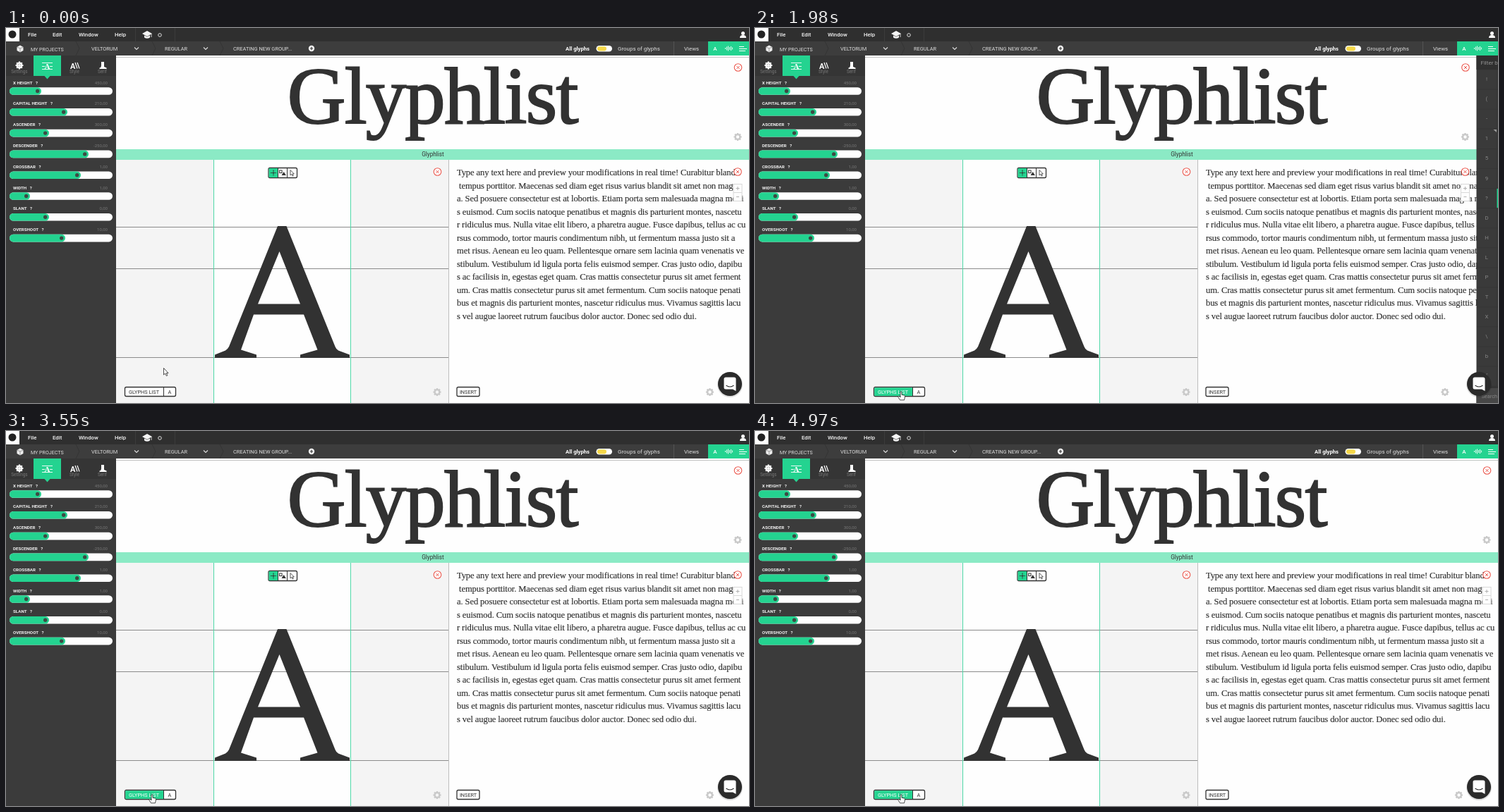
Recreate the animation shown at these times as an HTML page. Size 1053 by 532 pixels, loop 5.24 s.

```html
<!DOCTYPE html>
<html lang="en">
<head>
<meta charset="utf-8">
<title>Glyph list panel</title>
<style>
  html, body { margin: 0; width: 100%; height: 100%; overflow: hidden; background: #fefefe; }
  svg { display: block; width: 100%; height: 100%; }
  text { font-family: Roboto, "Open Sans", sans-serif; white-space: pre; }
  .serif { font-family: "Liberation Serif", "Noto Serif", serif; }
</style>
</head>
<body>
<svg id="stage" viewBox="0 0 1053 532"></svg>
<script>
const GREEN = '#24d390', DARK = '#323232', LOOP = 5240, PANEL = 112;

// SVG string helpers
const el = (tag, attrs, inner = '') =>
  `<${tag} ${Object.entries(attrs).map(([k, v]) => `${k}="${v}"`).join(' ')}>${inner}</${tag}>`;
const rect = (x, y, width, height, fill, more = {}) => el('rect', { x, y, width, height, fill, ...more });
const circle = (cx, cy, r, fill, more = {}) => el('circle', { cx, cy, r, fill, ...more });
const path = (d, fill, more = {}) => el('path', { d, fill, ...more });
const stroke = (d, color, width = 1, more = {}) => path(d, 'none', { stroke: color, 'stroke-width': width, ...more });
const group = (inner, attrs = {}) => el('g', attrs, inner);
const at = (x, y, inner) => group(inner, { transform: `translate(${x} ${y})` });
const escapeText = s => s.replace(/&/g, '&amp;').replace(/</g, '&lt;');
const text = (x, y, s, size, fill, more = {}) => el('text', { x, y, 'font-size': size, fill, ...more }, escapeText(s));
const middle = { 'text-anchor': 'middle' };
const outline = { stroke: DARK, 'stroke-width': 1.3 };

function gear(x, y, color, r = 3.4) {
  let teeth = '';
  for (let i = 0; i < 8; i++) {
    const c = Math.cos(i * Math.PI / 4), s = Math.sin(i * Math.PI / 4);
    teeth += `M${c * r} ${s * r}L${c * r * 1.65} ${s * r * 1.65}`;
  }
  return at(x, y, circle(0, 0, r, 'none', { stroke: color, 'stroke-width': r * .7 }) + stroke(teeth, color, r * .65));
}

const closeIcon = (x, y) => at(x, y,
  circle(0, 0, 5.3, '#fefefe', { stroke: '#ec5a50', 'stroke-width': 1.1 }) +
  stroke('M-2-2L2 2M2-2L-2 2', '#ec5a50', 1));

const chevron = (x, y) => stroke(`M${x - 3} ${y - 1.5}l3 3l3-3`, '#ddd', 1.1);

function menuBar() {
  const menu = [[31, 'File'], [66, 'Edit'], [103, 'Window'], [154, 'Help']];
  return rect(0, 0, 1053, 19, '#2f2f2f') +
    rect(0, 0, 19, 19, '#fefefe') + circle(9, 9, 5.5, '#222') +
    menu.map(([x, s]) => text(x, 12, s, 7.8, '#f4f4f4', { 'font-weight': 500 })).join('') +
    stroke('M183.5 0V19M239.5 0V19', '#3c3c3c') +
    path('M193 8l7-4l7 4l-7 4zM196 10.5v3q4 2.5 8 0v-3l-4 2z', '#f4f4f4') + stroke('M206 8v5', '#f4f4f4', .8) +
    circle(218, 10, 2.3, 'none', { stroke: '#ddd', 'stroke-width': 1 }) +
    circle(1044.5, 7.5, 2.5, '#fff') + path('M1040 14q0-4 4.5-4t4.5 4z', '#fff');
}

function projectBar() {
  const label = (x, s, size = 7.4) => text(x, 31.5, s, size, '#dedede');
  const bars = [2, 5, 7, 4, 6, 3].map((h, i) => `M${1019.5 + i * 2} ${29 - h / 2}v${h}`).join('');
  return rect(0, 19, 1053, 20, '#3d3d3d') +
    stroke('M99 19l5 10l-5 10M207 19l5 10l-5 10M303 19l5 10l-5 10', '#343434') +
    path('M15.5 27l4.5-2.5l4.5 2.5v5l-4.5 2.5l-4.5-2.5z', '#eee') + stroke('M15.5 27l4.5 2l4.5-2M20 29v5', '#777', .7) +
    text(35, 32.5, 'MY PROJECTS', 7.1, '#dedede') +
    label(121, 'VELTORUM') + chevron(185, 29) + label(225, 'REGULAR') + chevron(283, 29) +
    label(322, 'CREATING NEW GROUP...') +
    circle(433, 29, 4.2, '#f4f4f4') + stroke('M430.8 29h4.4M433 26.8v4.4', '#3d3d3d', 1.2) +
    text(793, 31.5, 'All glyphs', 7.7, '#fff', { 'font-weight': 700 }) +
    rect(836.5, 25, 22.5, 8.5, '#fff', { rx: 4.25 }) + rect(838, 26.2, 13, 6.2, '#f6d84a', { rx: 3.1 }) +
    label(867, 'Groups of glyphs', 7.95) + stroke('M946.5 19V39', '#555') + label(961, 'Views', 7.9) +
    rect(995, 19, 58, 20, GREEN) + text(1005, 32, 'A', 8, '#fff', { ...middle, 'font-weight': 500 }) +
    stroke(bars, '#fff', .9) + stroke('M1039 26.5h7M1039 29.5h11M1039 32.5h9', '#fff', 1.1);
}

function sidebar() {
  const sliders = [
    ['X HEIGHT', '450,00', 50], ['CAPITAL HEIGHT', '210,00', 87], ['ASCENDER', '300,00', 61],
    ['DESCENDER', '-250,00', 117], ['CROSSBAR', '1,00', 106], ['WIDTH', '1,00', 34],
    ['SLANT', '0,00', 61], ['OVERSHOOT', '10,00', 84]];
  const tab = (x, s) => text(x, 63.5, s, 6.4, '#777', middle);
  const rows = sliders.map(([name, value, end], i) => at(0, i * 29.8,
    text(10, 79.6, name + '   ?', 6.2, '#f2f2f2', { 'font-weight': 700 }) +
    text(144, 79.6, value, 6.1, '#777', { 'text-anchor': 'end' }) +
    rect(5, 84.2, 146, 10.6, '#fefefe', { rx: 5.3 }) +
    rect(5, 84.2, end - 5, 10.6, GREEN, { rx: 5.3 }) +
    circle(end - 5.3, 89.5, 2.7, '#3d4a44'))).join('');
  return rect(0, 39, 156, 493, '#3b3b3b') + rect(0, 39, 156, 29, '#353535') +
    path('M39 39H78V68H62.5L58.5 72.5L54.5 68H39z', GREEN) +
    gear(19, 53, '#fff', 3.3) + circle(19, 53, 2, '#fff') + tab(19, 'Settings') +
    text(58.5, 58, 'A', 11, '#fff', { ...middle, 'font-weight': 700, class: 'serif' }) +
    stroke('M51 49.5h15M51 54.5h4M62 54.5h4M51 58.5h15', '#fff', .9) +
    text(91, 57.5, 'A', 11, '#fff', { 'font-weight': 700 }) + stroke('M98 49l3 8.5M101 49l3 8.5', '#fff', 1.2) + tab(97, 'Style') +
    path('M135 48h4v7l3.5 1.5v1.5h-10v-1.5q2.5-.5 2.5-3z', '#fff') + tab(136.5, 'Serif') + rows;
}

function wordView() {
  return rect(156, 39, 897, 133, '#fefefe') + stroke('M156 41.5H1053', '#b5b5b5', .8) +
    text(398.5, 135.3, 'Glyphlist', 115, DARK,
      { class: 'serif', 'letter-spacing': -1.9, stroke: DARK, 'stroke-width': 2 }) +
    rect(156, 172, 897, 15, '#8beac5') + text(605, 182, 'Glyphlist', 8.2, '#333', middle);
}

function glyphView() {
  const letterA = 'M385 281H397.5L466.5 452Q468 456 471 457.5L487 463.5V468H417V463.5L441.5 456.5L422 406.5H351' +
    'L333 456.5L355 463.5V468H296V463.5L311 457.5Q314 456 316 452zM387.5 317L357 391.5H417z';
  return rect(156, 187, 471, 345, '#f4f4f4') + rect(295, 187, 194, 345, '#fefefe') +
    stroke('M156 282.5H627M156 341.5H627M156 467.5H627', '#8b8b8b') +
    stroke('M294.5 187V532M488.5 187V532', '#4fd9a8') + path(letterA, DARK) +
    rect(372, 198.5, 40.5, 14, '#fefefe', { rx: 2, ...outline }) + rect(372.6, 199, 12.8, 13, GREEN) +
    stroke('M385.5 198.5v14M398.5 198.5v14', DARK) +
    stroke('M375 205.5h8M379 201.5v8', DARK, 1.1, { 'stroke-dasharray': '1.7 .6' }) +
    rect(387.6, 202, 3.5, 3.5, 'none', { stroke: DARK }) + path('M390.5 209l3.2-5l3.2 5z', DARK) +
    path('M403 201.5v7.5l1.8-1.6l1.4 2.6l1.1-.6l-1.3-2.5h2.3z', '#fff', { stroke: DARK, 'stroke-width': .8 }) +
    closeIcon(611.5, 204) + gear(611, 516.5, '#c9c9c9');
}

function textView() {
  const lines = [
    'Type any text here and preview your modifications in real time! Curabitur blandit',
    ' tempus porttitor. Maecenas sed diam eget risus varius blandit sit amet non magn',
    'a. Sed posuere consectetur est at lobortis. Etiam porta sem malesuada magna molli',
    's euismod. Cum sociis natoque penatibus et magnis dis parturient montes, nascetu',
    'r ridiculus mus. Nulla vitae elit libero, a pharetra augue. Fusce dapibus, tellus ac cu',
    'rsus commodo, tortor mauris condimentum nibh, ut fermentum massa justo sit a',
    'met risus. Aenean eu leo quam. Pellentesque ornare sem lacinia quam venenatis ve',
    'stibulum. Vestibulum id ligula porta felis euismod semper. Cras justo odio, dapibu',
    's ac facilisis in, egestas eget quam. Cras mattis consectetur purus sit amet ferment',
    'um. Cras mattis consectetur purus sit amet fermentum. Cum sociis natoque penati',
    'bus et magnis dis parturient montes, nascetur ridiculus mus. Vivamus sagittis lacu',
    's vel augue laoreet rutrum faucibus dolor auctor. Donec sed odio dui.'];
  return rect(627, 187, 426, 345, '#fefefe') + stroke('M627.5 187V532', '#bdbdbd') +
    lines.map((s, i) => text(639, 209 + i * 18.52, s, 12.6, '#303030',
      { class: 'serif', 'letter-spacing': -.12, stroke: '#303030', 'stroke-width': .15 })).join('') +
    rect(639, 509.5, 32, 13, '#fefefe', { rx: 2, ...outline }) + text(655, 518.7, 'INSERT', 7.3, DARK, middle);
}

function dockedIcons() {
  return closeIcon(1037.5, 56) + gear(1037, 154.5, '#c9c9c9') +
    rect(1031, 221.5, 12, 24, '#fefefe', { stroke: '#d8d8d8' }) + stroke('M1031 233.5h12', '#d8d8d8') +
    stroke('M1034.5 227.5h5M1037 225v5M1035 239.5h4', '#aaa', .9) + closeIcon(1037, 204);
}

// Drawn from x = 0; slides in from the right edge
function glyphPanel() {
  const glyphs = '!"#\'()+,-./0123456789:;=?ABCDEFGHIJKLMNOPQRSTUVWXYZ[\\]_abcdefghi';
  const cells = [...glyphs].map((ch, i) => {
    const x = (i % 4) * 28 + 14.5, y = Math.floor(i / 4) * 28.07 + 73, active = ch === 'A';
    return rect(x - 13.5, y - 13.5, 27.2, 27.2, active ? GREEN : '#3a3a3a') +
      text(x, y + 2.2, ch, 7.8, active ? '#fff' : '#858585', { ...middle, 'font-weight': active ? 700 : 400 });
  }).join('');
  return rect(0, 39, PANEL, 493, '#353535') + rect(0, 39, PANEL, 20, '#303030') +
    text(6, 51.5, 'Filter by latin', 8, '#929292') + stroke('M102 47.5h5M102 49.5h5M102 51.5h5', '#ccc', .9) +
    cells + path('M24 144h4.5v4zM108 425h4v4z', '#999') +
    rect(0, 511, PANEL, 21, '#474747') + text(7, 524.5, 'Search glyph...', 7.4, '#858585') +
    rect(86, 511, 26, 21, '#5be0b1') + path('M99 516l5 5l-2 .5l-2.5 3l-4-4l3-2.5z', '#fff') + stroke('M97 523l-3 3', '#fff');
}

function chatButton() {
  return circle(1026, 506, 18, '#000', { opacity: .12 }) + circle(1026, 505, 17, '#2b2b2b') +
    path('M1020 495.5h12q2.5 0 2.5 2.5v17l-4.5-2.5h-10q-2.5 0-2.5-2.5v-12q0-2.5 2.5-2.5z', '#fff') +
    stroke('M1020.5 507q5.5 4 11 0', '#2b2b2b', 1.2);
}

function listButton() {
  return rect(168.5, 509.5, 72, 13, '#fefefe', { rx: 2, ...outline }) +
    rect(169.2, 510.2, 54, 11.7, GREEN, { id: 'hover' }) + stroke('M223.5 509.5v13', DARK) +
    text(174, 518.7, 'GLYPHS LIST', 7.3, DARK, { id: 'listLabel' }) + text(232, 518.7, 'A', 7.3, DARK, middle);
}

const cursors =
  path('M0 0V9.5L2.2 7.5L3.8 11L5.4 10.3L3.8 7H6.5z', '#fff', { id: 'arrow', stroke: '#222', 'stroke-width': .8 }) +
  path('M-1 .5Q0-.8 1 .5V4.5L4.5 5.3Q5.7 5.7 5.5 7L4.5 12H-1.5L-4.2 7.5Q-4 6-2.5 6.7L-1 8z', '#fff',
    { id: 'hand', stroke: '#222', 'stroke-width': .8 });

document.getElementById('stage').innerHTML =
  wordView() + glyphView() + textView() + group(dockedIcons(), { id: 'dock' }) +
  group(gear(997.5, 516.5, '#c9c9c9'), { id: 'textGear' }) + group(glyphPanel(), { id: 'panel' }) +
  sidebar() + menuBar() + projectBar() + listButton() + chatButton() + group(cursors, { id: 'cursor' });

const [dock, textGear, panel, hover, listLabel, cursor, arrow, hand] =
  ['dock', 'textGear', 'panel', 'hover', 'listLabel', 'cursor', 'arrow', 'hand'].map(id => document.getElementById(id));

const clamp = v => Math.max(0, Math.min(1, v));
const smooth = v => v * v * (3 - 2 * v);

// cubic-bezier(.25, .1, .25, 1)
function ease(x) {
  if (x <= 0 || x >= 1) return clamp(x);
  const bezier = (u, a, b) => 3 * u * (1 - u) ** 2 * a + 3 * u * u * (1 - u) * b + u ** 3;
  let low = 0, high = 1;
  for (let i = 0; i < 20; i++) {
    const mid = (low + high) / 2;
    if (bezier(mid, .25, .25) < x) low = mid; else high = mid;
  }
  return bezier(low, .1, 1);
}

function openness(t) {
  for (const [open, close] of [[830, 1890], [2520, 3330], [4020, 4760]]) {
    if (t >= open && t < close) return ease((t - open + 40) / 275);
    if (t >= close && t < close + 220) return 1 - ease((t - close) / 210);
  }
  return 0;
}

const move = (node, x, y = 0) => node.setAttribute('transform', `translate(${x} ${y})`);

function render(t) {
  const p = openness(t);
  move(dock, -PANEL * p);
  move(textGear, -72 * p);
  move(panel, 1053 - PANEL * p);

  const travel = smooth(clamp((t - 30) / 450));
  const nudge = t < 1270 ? 0 : t < 1720 ? 1 : 2;
  const x = 223.5 - 14.5 * travel - nudge, y = 482.5 + 36.5 * travel - nudge * 1.6;
  const over = y >= 509.5;
  move(cursor, x, y);
  arrow.style.display = over ? 'none' : '';
  hand.style.display = over ? '' : 'none';

  const glow = t >= 600 ? 1 : .95 * clamp((t - 330) / 150);
  hover.setAttribute('opacity', glow);
  listLabel.setAttribute('fill', glow > .5 ? '#fff' : DARK);
}

const start = performance.now();
function tick() {
  render((performance.now() - start) % LOOP);
  requestAnimationFrame(tick);
}
tick();
</script>
</body>
</html>
```
